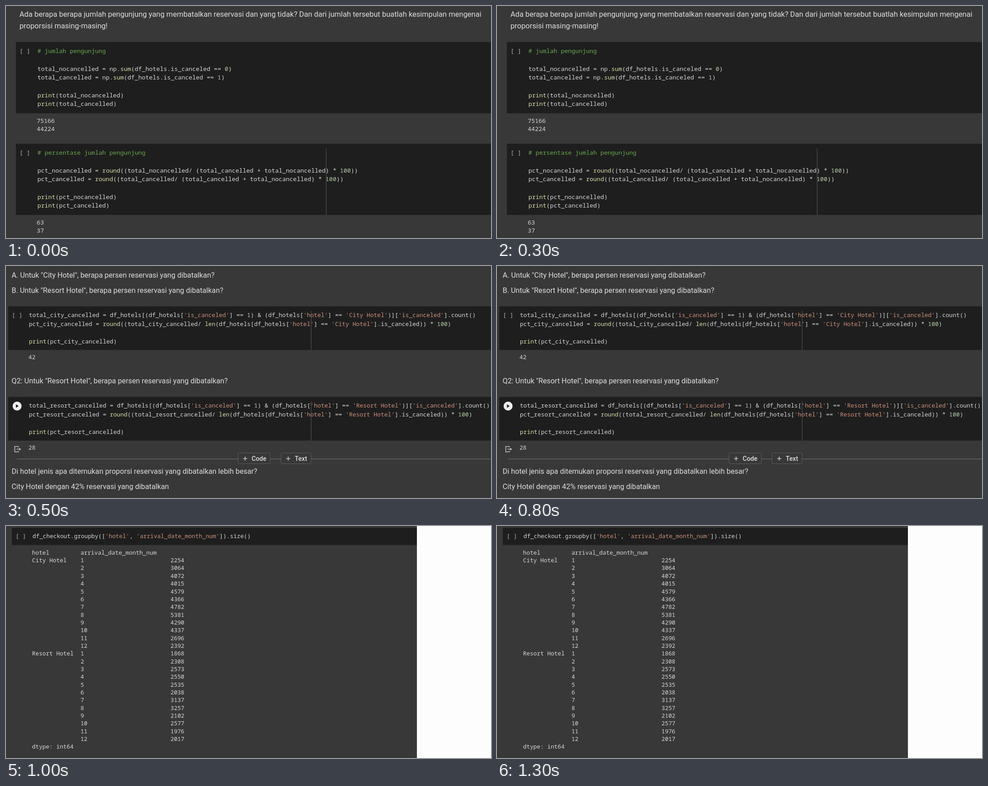
An HTML page with a canvas for the animation above (1.5 s loop, 1080 px wide and 518 px high).

```html
<!DOCTYPE html>
<html lang="id">
<head>
<meta charset="utf-8">
<title>Notebook slides</title>
<style>
  html, body { margin: 0; width: 100%; height: 100%; overflow: hidden; background: #383838; }
  canvas { display: block; }
</style>
</head>
<body>
<canvas id="stage" width="1080" height="518"></canvas>
<script>
const ctx = document.getElementById('stage').getContext('2d');
const SLIDE_MS = 500;
const PAGE = '#383838', CELL = '#1e1e1e', PLAIN = '#d8d8d8', RULER = '#5a5a5a';
const TOKEN = /#.*|'[^']*'|\b(?:print|round|sum|len)\b|\b\d+\b|[^#'\w]+|\w+/g;

function rect(x, y, w, h, color) {
  ctx.fillStyle = color;
  ctx.fillRect(x, y, w, h);
}

function prose(text, x, y, size, weight = 400) {
  ctx.font = `${weight} ${size}px Roboto, sans-serif`;
  ctx.fillStyle = '#dedede';
  ctx.fillText(text, x, y);
}

// Monospaced text; `advance` is the width of one character.
function mono(text, x, y, advance, color = PLAIN) {
  ctx.font = `500 ${advance / 0.6}px "Noto Sans Mono", monospace`;
  ctx.fillStyle = color;
  ctx.fillText(text, x, Math.round(y));
}

function tokenColor(token) {
  if (token[0] === '#') return '#6aa94f';
  if (token[0] === "'") return '#ce9178';
  if (/^\d/.test(token)) return '#b5cea8';
  if (/^(print|round|sum|len)$/.test(token)) return '#dcdcaa';
  return PLAIN;
}

function code(lines, x, y, advance, pitch) {
  lines.forEach((line, row) => {
    for (const { 0: token, index } of line.matchAll(TOKEN))
      mono(token, x + index * advance, y + row * pitch, advance, tokenColor(token));
  });
}

function output(lines, x, y, advance, pitch) {
  lines.forEach((line, row) => mono(line, x, y + row * pitch, advance));
}

function countSlide() {
  const advance = 8.02, pitch = 19.65;
  const cell = (top, lines, results) => {
    rect(22, top, 1058, 159, CELL);
    mono('[ ]', 30, top + 24.8, advance, '#b0b0b0');
    code(lines, 70, top + 24.8, advance, pitch);
    output(results, 68.5, top + 180.5, advance, 18);
  };
  prose('Ada berapa berapa jumlah pengunjung yang membatalkan reservasi dan yang tidak? Dan dari jumlah tersebut buatlah kesimpulan mengenai', 30, 24, 16.6);
  prose('proporsisi masing-masing!', 30, 50, 16.6);
  cell(80.5, [
    '# jumlah pengunjung', '',
    'total_nocancelled = np.sum(df_hotels.is_canceled == 0)',
    'total_cancelled = np.sum(df_hotels.is_canceled == 1)', '',
    'print(total_nocancelled)',
    'print(total_cancelled)'
  ], ['75166', '44224']);
  cell(307.5, [
    '# persentase jumlah pengunjung', '',
    'pct_nocancelled = round((total_nocancelled/ (total_cancelled + total_nocancelled) * 100))',
    'pct_cancelled = round((total_cancelled/ (total_cancelled + total_nocancelled) * 100))', '',
    'print(pct_nocancelled)',
    'print(pct_cancelled)'
  ], ['63', '37']);
  rect(712.5, 318, 1, 148.5, RULER);
}

function playButton(x, y) {
  ctx.fillStyle = '#f0f0f0';
  ctx.beginPath();
  ctx.arc(x, y, 10, 0, 2 * Math.PI);
  ctx.fill();
  ctx.fillStyle = CELL;
  ctx.fill(new Path2D(`M${x - 2.5} ${y - 4}l6 4l-6 4z`));
}

function outputIcon(x, y) {
  ctx.strokeStyle = '#c8c8c8';
  ctx.lineWidth = 1.5;
  ctx.stroke(new Path2D(`M${x + 8} ${y + 2}v-2h-8v12h8v-2M${x + 4} ${y + 6}h8`));
  ctx.fillStyle = '#c8c8c8';
  ctx.fill(new Path2D(`M${x + 10} ${y + 3}l4 3l-4 3z`));
}

function addButton(label, x, width) {
  ctx.beginPath();
  ctx.roundRect(x + 0.5, 417.5, width, 24, 2);
  ctx.fillStyle = PAGE;
  ctx.fill();
  ctx.strokeStyle = '#5c5c5c';
  ctx.lineWidth = 1;
  ctx.stroke();
  rect(x + 12, 429.3, 9, 1.4, '#d5d5d5');
  rect(x + 15.8, 425.5, 1.4, 9, '#d5d5d5');
  prose(label, x + 31, 435, 14.2, 500);
}

function percentSlide() {
  const advance = 7.835, pitch = 19.5, size = 16.3;
  const cell = (top, kind, name, result) => {
    rect(5, top, 1075, 97.5, CELL);
    rect(679, top + 10, 1, 87.5, RULER);
    code([
      `total_${kind}_cancelled = df_hotels[(df_hotels['is_canceled'] == 1) & (df_hotels['hotel'] == '${name}')]['is_canceled'].count()`,
      `pct_${kind}_cancelled = round((total_${kind}_cancelled/ len(df_hotels[df_hotels['hotel'] == '${name}'].is_canceled)) * 100)`, '',
      `print(pct_${kind}_cancelled)`
    ], 51, top + 24, advance, pitch);
    mono(result, 50, top + 118, advance);
  };
  prose('A. Untuk "City Hotel", berapa persen reservasi yang dibatalkan?', 12.5, 26, size);
  prose('B. Untuk "Resort Hotel", berapa persen reservasi yang dibatalkan?', 12.5, 60, size);
  cell(90, 'city', 'City Hotel', '42');
  mono('[ ]', 13, 114, advance, '#b0b0b0');
  prose('Q2: Untuk "Resort Hotel", berapa persen reservasi yang dibatalkan?', 12.5, 262, size);
  cell(292.3, 'resort', 'Resort Hotel', '28');
  playButton(24.7, 312.7);
  outputIcon(19.5, 403);
  rect(24, 430.5, 1056, 1, '#7a7a7a');
  addButton('Code', 516, 72);
  addButton('Text', 612, 67);
  prose('Di hotel jenis apa ditemukan proporsi reservasi yang dibatalkan lebih besar?', 12.5, 464, size);
  prose('City Hotel dengan 42% reservasi yang dibatalkan', 12.5, 498, size);
}

const MONTHLY = {
  'City Hotel': [2254, 3064, 4072, 4015, 4579, 4366, 4782, 5381, 4290, 4337, 2696, 2392],
  'Resort Hotel': [1868, 2308, 2573, 2550, 2535, 2038, 3137, 3257, 2102, 2577, 1976, 2017]
};
const TABLE = [
  'hotel'.padEnd(14) + 'arrival_date_month_num',
  ...Object.entries(MONTHLY).flatMap(([name, sizes]) => sizes.map((size, i) =>
    (i ? '' : name).padEnd(14) + String(i + 1).padEnd(26) + size)),
  'dtype: int64'
];

function tableSlide() {
  const advance = 7.714;
  rect(13, 4, 902, 38.5, CELL);
  mono('[ ]', 21.5, 27.4, advance, '#b0b0b0');
  code(["df_checkout.groupby(['hotel', 'arrival_date_month_num']).size()"], 59, 27.4, advance, 0);
  output(TABLE, 58, 63.8, advance, 17.34);
  rect(915, 0, 165, 518, '#fdfdfd');
}

const slides = [countSlide, percentSlide, tableSlide];

function frame() {
  rect(0, 0, 1080, 518, PAGE);
  slides[Math.floor(performance.now() / SLIDE_MS) % slides.length]();
  requestAnimationFrame(frame);
}
frame();
</script>
</body>
</html>
```
